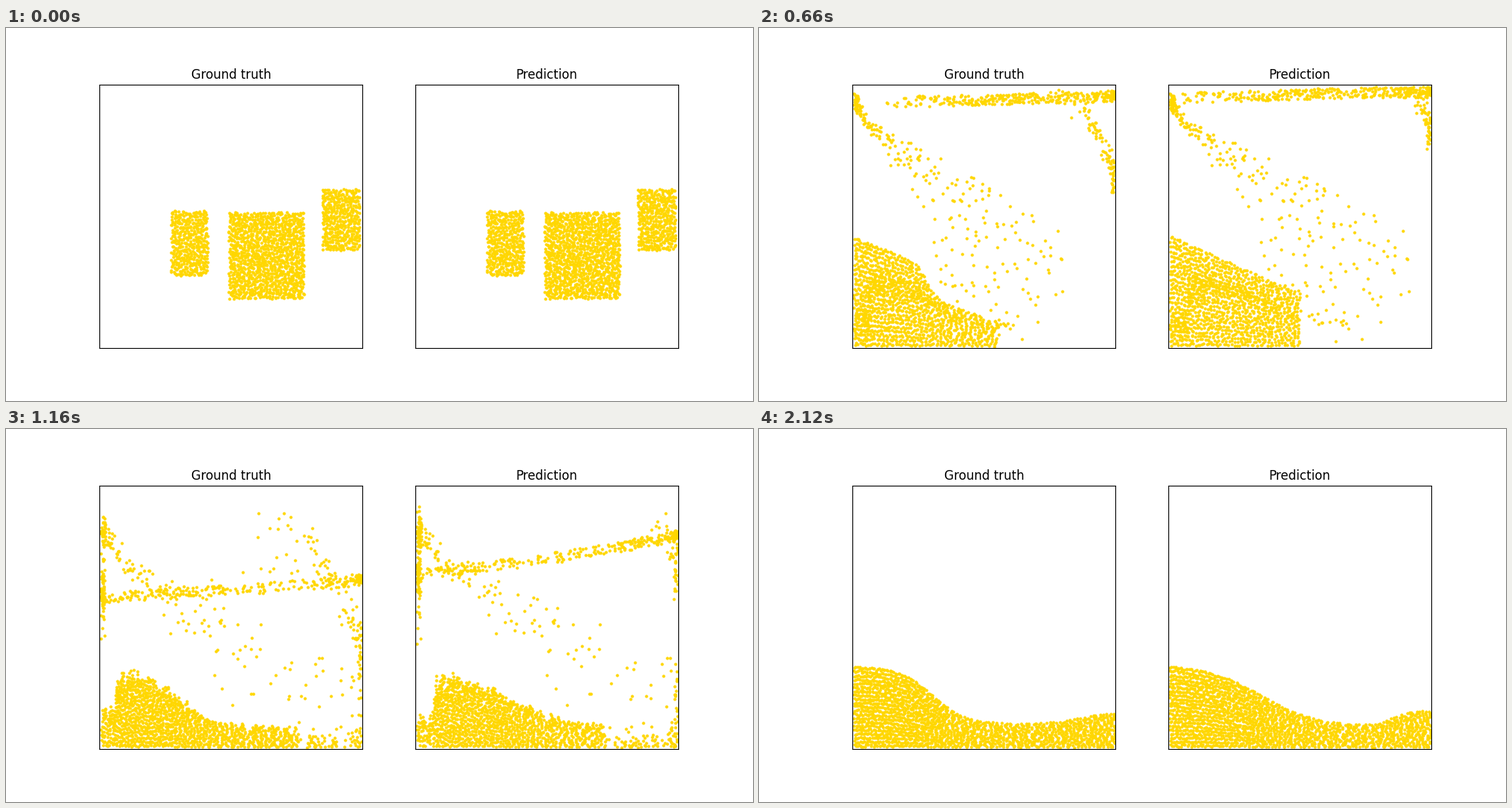
These frames come from a looping animation (1000 by 500 pixels, 2.14 s). A matplotlib script:

```python
import numpy as np
import matplotlib.pyplot as plt
from matplotlib.animation import FuncAnimation

STEP, COUNT, SUB = 20, 107, 4
GRAVITY = 5.8e-4                      # px per ms^2
LEFT, RIGHT, ROOF, FLOOR = 127, 476.5, 79, 427
TOUCH, SLUMPED = 280, 660             # when the big block lands and has collapsed

# fan: speed off the wall, mean rise and spread of the splash
# hold: when grains drop off the roof at the left, extra wait at the right
# slump: height, slope, step and end of the collapsed block
# rest: base, left rise, its middle and width, right rise, its middle and width
TRUTH = dict(fan_left=(0.51, -0.08, 0.32), fan_right=(0.526, -1.0, 0.7),
             hold=(430, 100), slump=(150, 0.4, 40, 322),
             rest=(34, 78, 232, 22, 16, 430, 20))
GUESS = dict(fan_left=(0.585, -0.08, 0.32), fan_right=(0.62, -1.15, 0.75),
             hold=(480, 240), slump=(152, 0.45, 0, 303),
             rest=(30, 85, 250, 38, 22, 425, 12))


def sigmoid(x):
    return 1 / (1 + np.exp(-x))


def slump_height(x, height, slope, step, end):
    h = height - slope * (x - LEFT) - step * sigmoid((x - 225) / 6)
    return np.where(x < end, h, 0)


def rest_height(x, base, a, mid_a, width_a, b, mid_b, width_b):
    return base + a * sigmoid((mid_a - x) / width_a) + b * sigmoid((x - mid_b) / width_b)


def grains(n, rng):
    """Evenly spread points in the unit square with a little jitter."""
    i = np.arange(1, n + 1)[:, None]
    uv = (i * [0.7548776662, 0.5698402910] + 0.5) % 1
    uv += rng.uniform(-0.5, 0.5, (n, 2)) / np.sqrt(n)
    return 1 - np.abs(1 - np.abs(uv))


def fan(uv, side, speed, rise, spread, rng):
    """Velocity after the impact: the middle of a block rebounds fastest."""
    phi = np.pi * (uv[:, 1] - 0.5)
    vx = side * speed * np.cos(phi) ** 3 * (1 - 0.6 * uv[:, 0])
    vy = rise + spread * np.sin(phi)
    return np.stack([vx, vy], 1) * rng.normal(1, 0.03, (len(uv), 2))


def pack(x, order, height, end, rng):
    """Fill the area under a profile evenly, keeping order along x and in depth."""
    grid = np.linspace(LEFT, end, 300)
    cum = np.cumsum(height(grid))
    cum = (cum - cum[0]) / (cum[-1] - cum[0])
    columns = np.array_split(np.argsort(x), round((end - LEFT) / 3.6))
    out = np.empty((len(x), 2))
    for c, col in enumerate(columns):
        col = col[np.argsort(order[col])]
        n = len(col)
        px = np.interp((c + rng.random(n)) / len(columns), cum, grid)
        v = (np.arange(n) + rng.uniform(0.2, 0.8, n)) / n
        out[col] = np.stack([px, FLOOR - (height(px) - 2) * v], 1)
    return out


def fly(p, surface, rng):
    """Throw the two small blocks at the walls; returns tracks and landing times."""
    n = 415
    uv = grains(n, rng), grains(n, rng)
    pos = np.vstack([[221, 245] + uv[0] * [49, 87], [423, 216] + uv[1] * [50.5, 82]])
    vel = np.repeat([[-1.1, -0.2], [0.6, -0.45]], n, axis=0)
    splash = np.vstack([fan(uv[0], 1, *p["fan_left"], rng),
                        fan(uv[1], -1, *p["fan_right"], rng)])
    depth = rng.random((2 * n, 2))
    lo, hi = LEFT + 5 * depth[:, 0], RIGHT - 5 * depth[:, 0]
    roof = ROOF + 14 * depth[:, 1]
    kick = rng.uniform(-0.6, 0.3, 2 * n)
    fresh = np.ones(2 * n, bool)
    landed = np.full(2 * n, np.inf)
    track = np.empty((COUNT, 2 * n, 2))
    dt = STEP / SUB
    for k in range(COUNT * SUB):
        t = k * dt
        if k % SUB == 0:
            track[k // SUB] = pos
        air = np.isinf(landed)
        wait = p["hold"][0] + p["hold"][1] * ((pos[:, 0] - LEFT) / (RIGHT - LEFT)) ** 2
        held = (pos[:, 1] <= roof) & (t < wait)
        vel[air & ~held, 1] += GRAVITY * dt
        pos[air] += vel[air] * dt

        top = pos[:, 1] < roof
        pos[top, 1] = roof[top]
        vel[top, 1] = np.maximum(vel[top, 1], 0)

        hit = ((pos[:, 0] < lo) & (vel[:, 0] < 0)) | ((pos[:, 0] > hi) & (vel[:, 0] > 0))
        first, again = hit & fresh, hit & ~fresh
        vel[again, 1] += kick[again] * np.abs(vel[again, 0])
        vel[again, 0] = 0
        vel[first] = splash[first]
        fresh &= ~hit
        pos[hit, 0] = np.clip(pos[hit, 0], lo[hit], hi[hit])

        landed[air & (pos[:, 1] > FLOOR - surface(pos[:, 0], t))] = t
    return track, np.minimum(landed, COUNT * STEP)


def slide(start, t):
    """The big block in free fall, squashed once it meets the floor."""
    x, y = start[:, 0] - 0.486 * t, start[:, 1]
    drop = 0.18 * t + GRAVITY / 2 * t * t
    top = 247 + drop
    squash = min(1, (FLOOR - top) / 116)
    left = 298 - 0.486 * t
    return np.stack([left + (x - left) / squash, top + (y - 247) * squash], 1)


def build(p, seed):
    rng = np.random.default_rng(seed)

    def slump(x):
        return slump_height(x, *p["slump"])

    def rest(x):
        return rest_height(x, *p["rest"])

    def settle(t):
        return 1 - np.exp(-max(t - SLUMPED, 0) / 250)

    def surface(x, t):
        grown = slump(x) * np.clip((t - 240) / 420, 0, 1)
        return grown + (rest(x) - grown) * settle(t)

    start = [298, 247] + grains(1170, rng) * [101, 116]
    heap = pack(start[:, 0], -start[:, 1], slump, p["slump"][-1] - 1, rng)
    track, landed = fly(p, surface, rng)
    home = pack(np.r_[heap[:, 0], track[-1, :, 0]], np.r_[-heap[:, 1], landed],
                rest, RIGHT, rng)
    heap_home, home = np.split(home, [len(heap)])

    frames = []
    for i in range(COUNT):
        t = i * STEP
        q = 1 - (1 - np.clip((t - TOUCH) / (SLUMPED - TOUCH), 0, 1)) ** 2
        block = slide(start, min(t, TOUCH))
        block = block + (heap - block) * q
        block = block + (heap_home - block) * settle(t)
        creep = 1 - np.exp(-np.maximum(t - landed, 0) / 90)[:, None]
        loose = track[i] + (home - track[i]) * creep
        frames.append(np.vstack([block, loose]).T)
    return frames


fig, axes = plt.subplots(1, 2, figsize=(10, 5), dpi=100)
panels = []
for ax, title, params in zip(axes, ("Ground truth", "Prediction"), (TRUTH, GUESS)):
    ax.set_title(title)
    ax.set_xlim(125, 477.27)
    ax.set_ylim(428.64, 76.36)
    ax.set_aspect("equal")
    ax.set_xticks([])
    ax.set_yticks([])
    dots, = ax.plot([], [], "o", ms=2, color="gold")
    panels.append((dots, build(params, 4)))


def update(i):
    for dots, frames in panels:
        dots.set_data(*frames[i])
    return [dots for dots, _ in panels]


anim = FuncAnimation(fig, update, frames=COUNT, interval=STEP,
                     init_func=lambda: update(0), repeat=True, repeat_delay=0)
plt.show()
```
